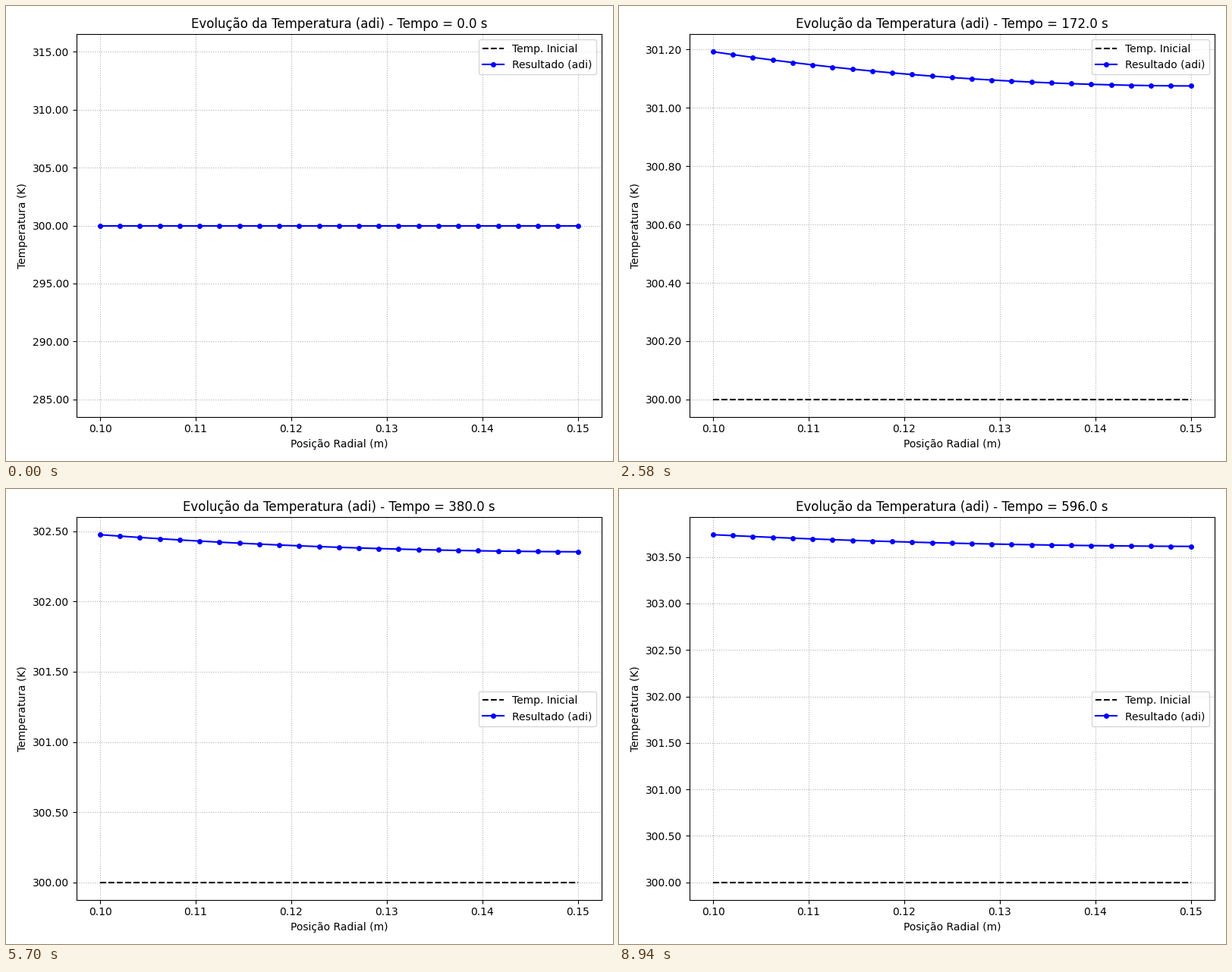
A matplotlib script that plays this animation: 800 by 600 pixels, repeating every 9 s.

```python
import numpy as np
import matplotlib.pyplot as plt
from matplotlib.animation import FuncAnimation
from matplotlib.ticker import FormatStrFormatter

# Hollow cylinder: constant heat flux inside, convection outside
R_IN, R_OUT, NODES = 0.10, 0.15, 25
K, RHO_C = 201.5, 2700 * 900
FLUX, H = 1000.0, 25.0
T0 = 300.0

FRAMES, INTERVAL = 150, 60
STEP = 4.0      # simulated seconds per frame
SUBSTEPS = 40

r = np.linspace(R_IN, R_OUT, NODES)


def solve():
    """Temperature profiles for every frame (finite volumes, Crank-Nicolson)."""
    dr = r[1] - r[0]
    mid = (r[1:] + r[:-1]) / 2
    faces = np.concatenate(([R_IN], mid, [R_OUT]))
    mass = RHO_C * np.diff(faces ** 2) / 2
    link = K * mid / dr

    a = np.diag(link, 1) + np.diag(link, -1)
    a -= np.diag(a.sum(axis=1))
    a[-1, -1] -= H * R_OUT
    a /= mass[:, None]
    heat = np.zeros(NODES)
    heat[0] = FLUX * R_IN / mass[0]

    dt = STEP / SUBSTEPS
    eye = np.eye(NODES)
    left = np.linalg.inv(eye - a * dt / 2)
    move, gain = left @ (eye + a * dt / 2), left @ heat * dt

    rise = np.zeros(NODES)
    profiles = [rise]
    for _ in range(FRAMES - 1):
        for _ in range(SUBSTEPS):
            rise = move @ rise + gain
        profiles.append(rise)
    return T0 + np.array(profiles)


temps = solve()

plt.rcParams["font.family"] = "DejaVu Sans"
fig, ax = plt.subplots(figsize=(8, 6), dpi=100)
ax.plot(r, np.full(NODES, T0), "k--", label="Temp. Inicial")
curve, = ax.plot(r, temps[0], "b-o", markersize=4, label="Resultado (adi)")
title = ax.set_title("")
ax.set_xlabel("Posição Radial (m)")
ax.set_ylabel("Temperatura (K)")
ax.yaxis.set_major_formatter(FormatStrFormatter("%.2f"))
ax.grid(True, linestyle=":")
ax.legend(loc="best")


def update(i):
    curve.set_ydata(temps[i])
    title.set_text(f"Evolução da Temperatura (adi) - Tempo = {i * STEP:.1f} s")
    ax.relim()
    ax.autoscale_view()
    return curve, title


update(0)
fig.tight_layout()

anim = FuncAnimation(fig, update, frames=FRAMES, interval=INTERVAL,
                     init_func=lambda: update(0), repeat=True, repeat_delay=0)
plt.show()
```
